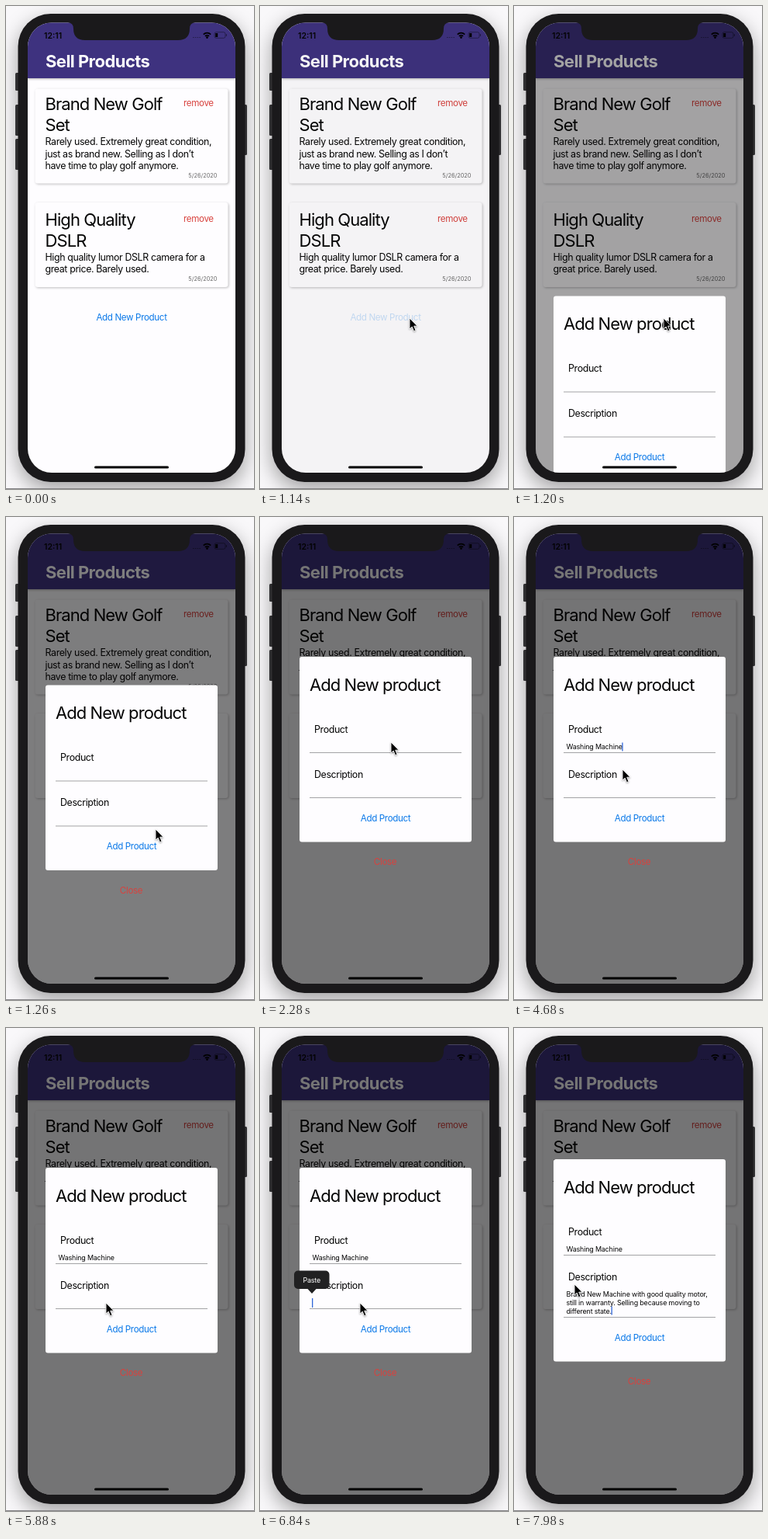
An HTML page that plays this animation: 320x622 px, repeating every 8000 ms.

```html
<!DOCTYPE html>
<html lang="en">
<head>
<meta charset="utf-8">
<title>Sell Products</title>
<style>
  html, body { margin: 0; width: 100%; height: 100%; overflow: hidden; background: #f9f8fa; }
  svg { display: block; width: 320px; height: 622px; }
  text { font: 12.4px Inter, "Open Sans", sans-serif; font-optical-sizing: none; letter-spacing: -.03em; fill: #050505; white-space: pre; }
  .bar { font-size: 22px; font-weight: 700; letter-spacing: -.025em; fill: #fff; }
  .head { font-size: 22px; letter-spacing: -.042em; }
  .button { font-size: 11.6px; fill: #0a78e8; }
  .red { fill: #d8423e; }
  .date { font-size: 7.4px; letter-spacing: 0; fill: #666; text-anchor: end; }
  .clock { font-size: 10.5px; font-weight: 600; letter-spacing: 0; }
  .input { font-size: 8.95px; letter-spacing: -.02em; }
  .mid { text-anchor: middle; }
  .card { fill: #fefdff; filter: drop-shadow(1px 1.2px 1.6px rgba(0, 0, 0, .25)); }
  .rule { stroke: #a3a3a5; stroke-width: 1; }
  #phone { filter: drop-shadow(0 9px 13px rgba(0, 0, 0, .36)); }
  #header { filter: drop-shadow(0 1.5px 1.5px rgba(0, 0, 0, .3)); }
  #cursor { filter: drop-shadow(0 1px 1px rgba(0, 0, 0, .35)); }
</style>
</head>
<body>
<svg viewBox="0 0 320 622">
  <defs>
    <clipPath id="screen"><rect x="28" y="21.5" width="268" height="579.5" rx="31"/></clipPath>
  </defs>
  <rect width="320" height="622" fill="#f9f8fa"/>
  <g fill="#3a393c">
    <rect x="12" y="86" width="6" height="23" rx="1.5"/>
    <rect x="12" y="127" width="6" height="40" rx="1.5"/>
    <rect x="12" y="171" width="6" height="40" rx="1.5"/>
    <rect x="305" y="127" width="6" height="65" rx="1.5"/>
  </g>
  <rect id="phone" x="15.5" y="10" width="293" height="603" rx="42" fill="#1a191b"/>

  <g clip-path="url(#screen)">
    <rect x="28" y="21" width="268" height="581" fill="#fefdff"/>
    <rect id="header" x="28" y="21" width="268" height="72" fill="#3e327f"/>
    <text class="bar" x="51" y="79">Sell Products</text>

    <rect class="card" x="37.5" y="106.5" width="249" height="122" rx="3.5"/>
    <text class="head" x="50.5" y="134">Brand New Golf</text>
    <text class="head" x="50.5" y="161">Set</text>
    <text x="50.5" y="179.2">Rarely used. Extremely great condition,</text>
    <text x="50.5" y="194.6">just as brand new. Selling as I don’t</text>
    <text x="50.5" y="210">have time to play golf anymore.</text>
    <text class="button red" x="229" y="129">remove</text>
    <text class="date" x="272.5" y="220.5">5/26/2020</text>

    <rect class="card" x="37.5" y="253" width="249" height="109" rx="3.5"/>
    <text class="head" x="50.5" y="283">High Quality</text>
    <text class="head" x="50.5" y="310">DSLR</text>
    <text x="50.5" y="328.2">High quality lumor DSLR camera for a</text>
    <text x="50.5" y="343.4">great price. Barely used.</text>
    <text class="button red" x="229" y="278">remove</text>
    <text class="date" x="272.5" y="354">5/26/2020</text>

    <text id="open" class="button mid" x="162" y="405">Add New Product</text>

    <text class="clock" x="49" y="41.5">12:11</text>
    <g fill="none" stroke="#000" stroke-width="1.6">
      <path d="M241 40.5h10" stroke-dasharray="1.6 1.2" stroke-width="1.2" opacity=".4"/>
      <path d="M254.8 36.6a6.6 6.6 0 0 1 9.4 0M256.9 38.9a3.7 3.7 0 0 1 5.2 0"/>
      <circle cx="259.5" cy="40.5" r=".6"/>
      <rect x="269" y="33.7" width="14" height="7.6" rx="2.2" stroke-width=".8" opacity=".5"/>
      <path d="M284.4 36.2v2.6" stroke-width="1" opacity=".5"/>
      <path d="M271.7 35v5" stroke-width="3"/>
    </g>

    <rect id="backdrop" x="28" y="21" width="268" height="581" fill="#000"/>

    <g id="modal">
      <rect id="sheet" x="51" width="222" rx="3" fill="#fefdff"/>
      <text class="head" x="64" y="44">Add New product</text>
      <text x="70" y="97.8">Product</text>
      <text id="product" class="input" x="67.5" y="119"></text>
      <path class="rule" d="M64 123.5h196"/>
      <text x="70" y="156">Description</text>
      <text class="input line" x="67.5" y="176.8"></text>
      <text class="input line" x="67.5" y="187.8"></text>
      <text class="input line" x="67.5" y="198.8"></text>
      <rect id="caret" width="1.3" fill="#2f66d8"/>
      <g id="foot">
        <path class="rule" d="M64 181.5h196"/>
        <text class="button mid" x="162" y="211.5">Add Product</text>
        <text class="button red mid" x="161.5" y="268.2">Close</text>
      </g>
    </g>

    <g id="menu">
      <path d="M49 312.5h35.5a5 5 0 0 1 5 5v13.5a5 5 0 0 1-5 5h-12l-5.5 6-5.5-6h-12.5a5 5 0 0 1-5-5v-13.5a5 5 0 0 1 5-5z" fill="#212122"/>
      <text class="input mid" x="66.7" y="327.5" style="fill:#fff">Paste</text>
    </g>
  </g>

  <path d="M80 21h164q-7 1-7 8 0 15-15 15H102q-15 0-15-15 0-7-7-8z" fill="#1a191b"/>
  <rect x="114" y="592.5" width="96" height="3" rx="1.5"/>
  <rect y="621" width="320" height="1" fill="#858487"/>
  <path id="cursor" d="M0 0v14l3.2-2.9 2.3 5.6 2.5-1-2.3-5.5h4.3z" stroke="#fff" stroke-width=".9" stroke-linejoin="round"/>
</svg>
<script>
const LOOP = 8000;
const OPEN = 1124, SLIDE = 198;
const FOCUS_PRODUCT = 2520, TYPE_START = 2640, TYPE_STEP = 104;
const FOCUS_DESCRIPTION = 5060, MENU = 6400, PASTE = 7720;
const PRODUCT = 'Washing Machine';
const DESCRIPTION = [
  'Brand New Machine with good quality motor,',
  'still in warranty. Selling because moving to',
  'different state.'
];
// Cursor stops: time, x, y
const STOPS = [
  [60, 298, 630], [900, 193, 402], [1740, 193, 402], [2220, 169, 290],
  [4320, 169, 290], [4680, 140, 325], [5040, 129, 354], [6000, 129, 354],
  [6200, 126, 374], [6400, 129, 354], [6900, 129, 354], [7500, 78, 330]
];

const $ = id => document.getElementById(id);
const lines = [...document.querySelectorAll('.line')];
const clamp = v => Math.min(1, Math.max(0, v));
const smooth = v => v * v * (3 - 2 * v);
const set = (el, attrs) => Object.entries(attrs).forEach(([k, v]) => el.setAttribute(k, v));
const move = (el, x, y) => set(el, { transform: `translate(${x} ${y})` });
const show = (el, on) => set(el, { visibility: on ? 'visible' : 'hidden' });
const write = (el, s) => { if (el.textContent !== s) el.textContent = s; };

// CSS "ease" curve, solved by bisection
function ease(x) {
  const bezier = (a, b, s) => 3 * a * s * (1 - s) ** 2 + 3 * b * s * s * (1 - s) + s ** 3;
  let low = 0, high = 1;
  for (let i = 0; i < 20; i++) {
    const s = (low + high) / 2;
    if (bezier(.25, .25, s) < x) low = s; else high = s;
  }
  return bezier(.1, 1, low);
}

function cursorAt(t) {
  const next = STOPS.findIndex(stop => stop[0] > t);
  if (next < 0) return STOPS.at(-1).slice(1);
  if (next === 0) return STOPS[0].slice(1);
  const [t0, x0, y0] = STOPS[next - 1], [t1, x1, y1] = STOPS[next];
  const k = smooth((t - t0) / (t1 - t0));
  return [x0 + (x1 - x0) * k, y0 + (y1 - y0) * k];
}

function drawCaret(t, pasted, typed) {
  const inProduct = t < FOCUS_DESCRIPTION;
  const lastKey = TYPE_START + TYPE_STEP * PRODUCT.length;
  const since = inProduct
    ? (t < TYPE_START ? FOCUS_PRODUCT : Math.min(t, lastKey))
    : pasted ? PASTE : t >= MENU ? MENU : FOCUS_DESCRIPTION;
  show($('caret'), t >= FOCUS_PRODUCT && (t - since) % 1000 < 520);
  const field = inProduct ? $('product') : lines[pasted ? 2 : 0];
  const width = typed || pasted ? field.getComputedTextLength() : 0;
  const y = inProduct ? 110.5 : pasted ? 189.5 : 168;
  set($('caret'), { x: 67 + width, y, height: inProduct || pasted ? 11 : 12 });
}

function draw(t) {
  const opened = ease(clamp((t - OPEN) / SLIDE));
  const pasted = t >= PASTE;
  const typed = Math.floor(clamp((t - TYPE_START) / (TYPE_STEP * PRODUCT.length)) * PRODUCT.length);

  set($('open'), { opacity: 1 - .78 * clamp((t - 960) / 120) });
  set($('backdrop'), { opacity: .54 * opened });
  show($('modal'), opened > 0);
  move($('modal'), 0, (pasted ? 169 : 180) + 580 * (1 - opened));
  set($('sheet'), { height: pasted ? 260.5 : 238.5 });
  move($('foot'), 0, pasted ? 22 : 0);

  write($('product'), PRODUCT.slice(0, typed));
  lines.forEach((line, i) => write(line, pasted ? DESCRIPTION[i] : ''));
  drawCaret(t, pasted, typed);

  set($('menu'), { opacity: clamp((t - MENU) / 150) * (1 - clamp((t - PASTE) / 120)) });
  move($('cursor'), ...cursorAt(t));
}

const start = performance.now();
function tick() {
  draw((performance.now() - start) % LOOP);
  requestAnimationFrame(tick);
}
tick();
</script>
</body>
</html>
```
